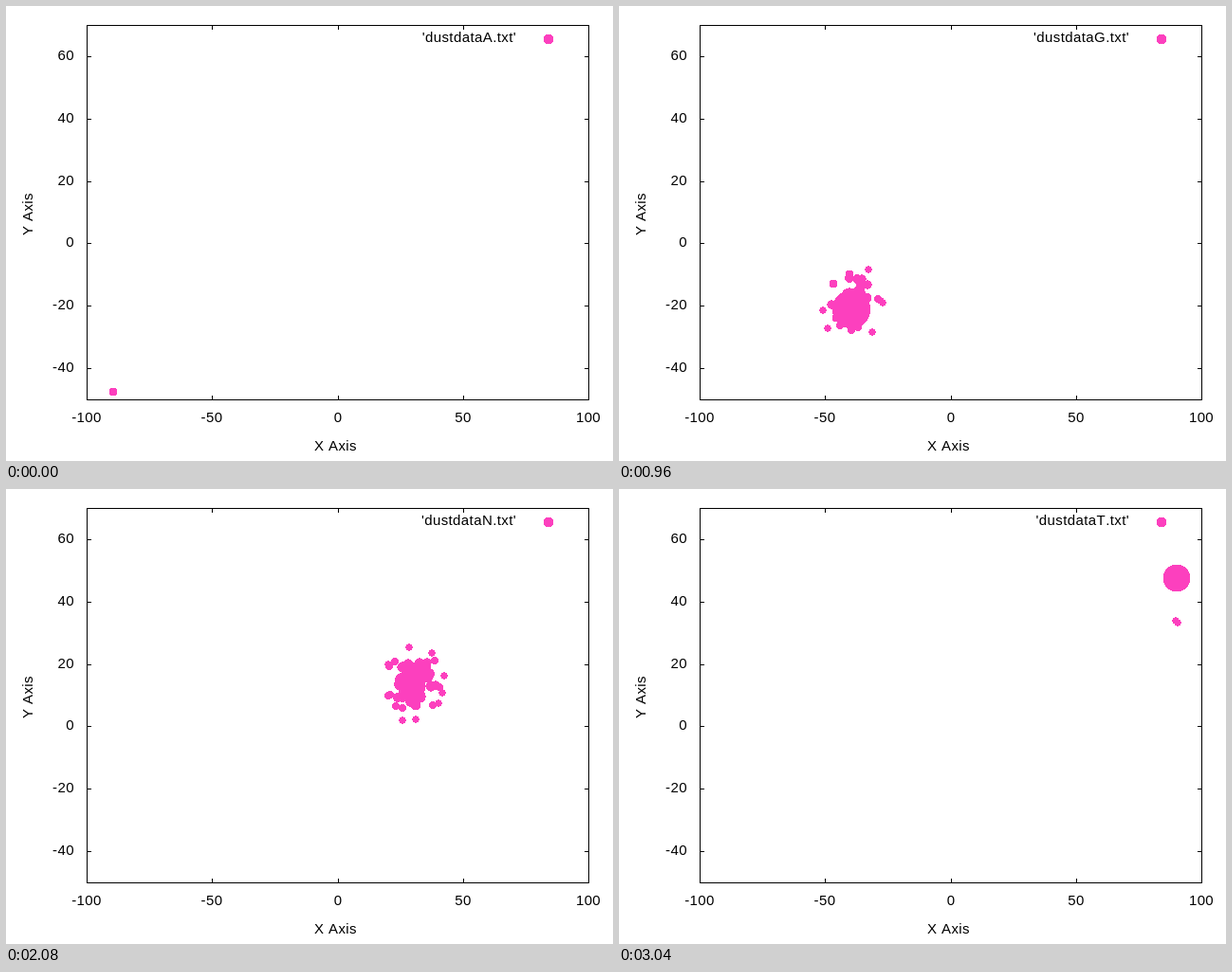
Animation, 640 px wide and 480 px high, one loop 3200 ms. Source, as an HTML page with a canvas:

```html
<!DOCTYPE html>
<html>
<head>
<meta charset="utf-8">
<style>
html, body { margin: 0; width: 100%; height: 100%; overflow: hidden; background: #fff; }
canvas { display: block; }
</style>
</head>
<body>
<canvas id="plot" width="640" height="480"></canvas>
<script>
const ctx = document.getElementById('plot').getContext('2d');
const STEP = 160, COUNT = 20, PINK = '#fc40be';

// Key points of the flight: step, core radius, dust count, how far the dust hangs below the core.
const KEYS = [
  [0, 4.5, 0, 0], [4, 8.5, 16, -16], [8, 32, 60, -4], [10, 59.5, 60, 0],
  [13, 14, 48, 6], [15, 25.5, 36, 15], [19, 14.5, 2, 45]
];

function stateAt(step) {
  const next = Math.max(1, KEYS.findIndex(key => key[0] >= step));
  const a = KEYS[next - 1], b = KEYS[next];
  const t = (step - a[0]) / (b[0] - a[0]);
  return a.map((value, k) => value + (b[k] - value) * t).slice(1);
}

function seeded(seed) {
  return () => {
    seed = (seed * 16807) % 2147483647;
    return seed / 2147483647;
  };
}

// Hard-edged disc built from pixel rows.
function disc(x, y, r) {
  x = Math.floor(x);
  y = Math.floor(y);
  for (let row = -Math.ceil(r); row < r; row++) {
    const half = Math.round(Math.sqrt(Math.max(0, r * r - (row + .5) ** 2)));
    ctx.fillRect(x - half, y + row, 2 * half, 1);
  }
}

// A core on a straight diagonal, with dust that is densest and coarsest in its middle.
function drawCloud(step) {
  const [core, dots, sag] = stateAt(step);
  const along = step - 10 + Math.max(0, 1 - step / 4);
  const x = 351 + 26.4 * along, y = 251 - 17.4 * along;
  const spread = Math.min(1, dots / 16);
  const random = seeded(step * 7919 + 31);
  disc(x, y, core);
  for (let k = 0; k < Math.round(dots); k++) {
    const angle = random() * Math.PI * 2, reach = random();
    const r = 3.55 + dots / 6 * (1 - reach) ** 2;
    disc(x + Math.cos(angle) * reach * 37 * spread,
         y + sag + Math.sin(angle) * reach * 43 * spread, r);
  }
}

function text(string, x, y, align) {
  ctx.textAlign = align;
  ctx.fillText(string, x, y);
}

function drawAxes() {
  ctx.fillStyle = ctx.strokeStyle = '#000';
  ctx.lineWidth = 1;
  ctx.strokeRect(85.5, 20.5, 529, 395);
  ctx.font = '15px "Liberation Sans", Arial, sans-serif';
  ctx.letterSpacing = '0.4px';
  ctx.fontKerning = 'none';
  for (let v = -100; v <= 100; v += 50) {
    const x = Math.round(349.5 + v * 2.645);
    ctx.fillRect(x, 20, 1, 5);
    ctx.fillRect(x, 411, 1, 5);
    text(v, x, 439, 'center');
  }
  for (let v = -40; v <= 60; v += 20) {
    const y = Math.round(250.4 - v * 3.2917);
    ctx.fillRect(85, y, 5, 1);
    ctx.fillRect(610, y, 5, 1);
    text(v, 72, y + 4, 'right');
  }
  text('X Axis', 347.5, 469, 'center');
  ctx.save();
  ctx.translate(28, 219.5);
  ctx.rotate(-Math.PI / 2);
  text('Y Axis', 0, 0, 'center');
  ctx.restore();
}

function draw(step) {
  ctx.fillStyle = '#fff';
  ctx.fillRect(0, 0, 640, 480);
  drawAxes();
  text(`'dustdata${String.fromCharCode(65 + step)}.txt'`, 538, 38, 'right');
  ctx.fillStyle = PINK;
  disc(572, 35, 5.2);
  drawCloud(step);
}

const start = performance.now();
function tick() {
  draw(Math.floor((performance.now() - start) / STEP) % COUNT);
  requestAnimationFrame(tick);
}
tick();
</script>
</body>
</html>
```
